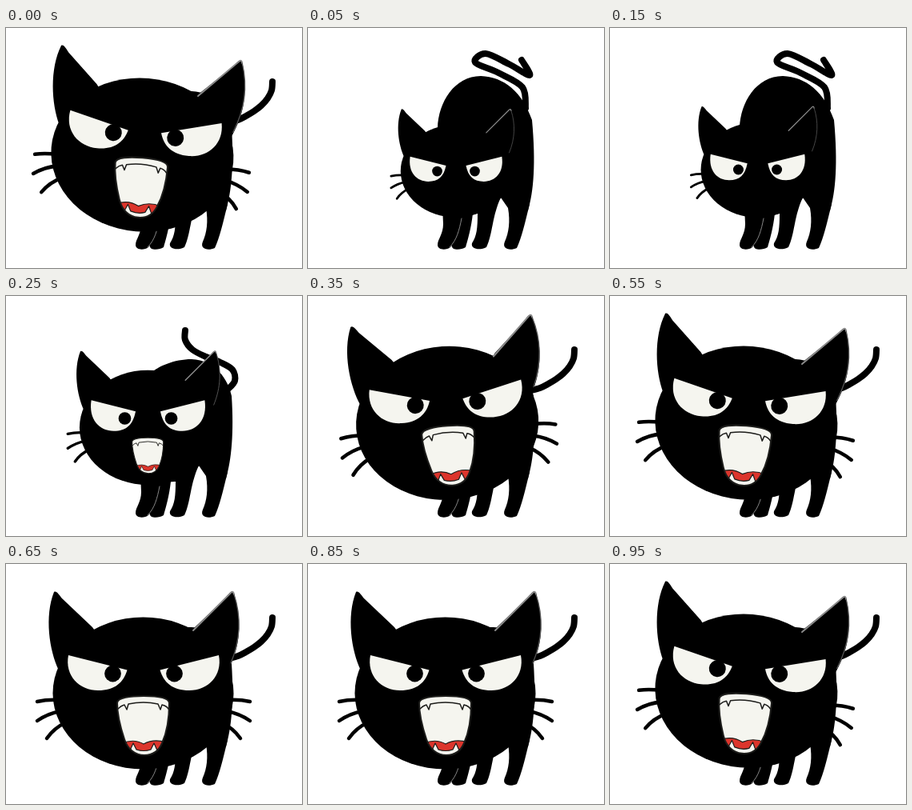
An HTML page with a canvas for the animation above (1000 ms loop, 370x300 px).

```html
<!DOCTYPE html>
<html lang="en">
<head>
<meta charset="utf-8">
<title>Hissing cat</title>
<style>
html, body { margin: 0; width: 100%; height: 100%; overflow: hidden; background: #fff; }
canvas { display: block; }
</style>
</head>
<body>
<canvas id="stage" width="370" height="300"></canvas>
<script>
const ctx = document.getElementById('stage').getContext('2d');
const LOOP = 1000;
const BLACK = '#000', WHITE = '#f5f5ef', RED = '#dc352c', LINE = '#1c1c1a';

// Tail shapes: curled, hooked, raised
const TAILS = [
  [272,100, 268,74, 238,56, 209,43, 222,32, 251,45, 277,59, 267,40],
  [277,117, 286,106, 283,92, 268,83, 250,76, 233,67, 224,55, 224,43],
  [278,118, 290,115, 300,110, 310,104, 319,97, 327,88, 332,78, 333,67]
];
// Back contour: arched, relaxed
const BACKS = [
  [162,125, 163,93, 183,60, 216,60, 245,61, 268,80, 280,115],
  [180,97, 190,88, 210,79, 232,79, 262,80, 278,105, 282,125]
];

const roar = (at, x, y, tilt, s = 1) =>
  ({ at, x, y, s, tilt, face: 0, lid: 0, mouth: 1, back: 1, tail: 2 });
const left = at => roar(at, 173, 158.3, -3.8, 1.01);
const right = at => roar(at, 173, 158.3, 4.9, 1.01);
const level = at => roar(at, 172, 161, 0);

const POSES = [
  right(0),
  { at: 50,  x: 185,   y: 178.5, s: .61,  tilt: 0, face: 25, lid: -7, mouth: 0,   back: 0,  tail: 0 },
  { at: 150, x: 184.5, y: 177,   s: .625, tilt: 0, face: 24, lid: -8, mouth: 0,   back: 0,  tail: 0 },
  { at: 200, x: 181,   y: 170,   s: .69,  tilt: 0, face: 16, lid: -7, mouth: .45, back: .5, tail: .5 },
  { at: 250, x: 177.5, y: 164,   s: .754, tilt: 0, face: 9.4, lid: -7, mouth: .8, back: 1,  tail: 1 },
  { at: 300, x: 175,   y: 162,   s: .88,  tilt: 0, face: 4,  lid: -3, mouth: .92, back: 1,  tail: 1.5 },
  left(350), level(450), right(550),
  level(650), left(750), level(850), right(950)
];

const mix = (a, b, k) => a.map((v, i) => v + (b[i] - v) * k);

function fill(d, color) {
  ctx.fillStyle = color;
  ctx.fill(new Path2D(d));
}

function stroke(d, color, width) {
  ctx.strokeStyle = color;
  ctx.lineWidth = width;
  ctx.stroke(new Path2D(d));
}

// Smooth curve through x,y pairs
function spline(p) {
  const n = p.length / 2;
  const at = (i, c) => p[2 * Math.max(0, Math.min(n - 1, i)) + c];
  let d = `M${p[0]},${p[1]}`;
  for (let i = 0; i < n - 1; i++) {
    const c = [];
    for (const k of [0, 1]) c.push(at(i, k) + (at(i + 1, k) - at(i - 1, k)) / 6);
    for (const k of [0, 1]) c.push(at(i + 1, k) - (at(i + 2, k) - at(i, k)) / 6);
    d += `C${c},${at(i + 1, 0)},${at(i + 1, 1)}`;
  }
  return d;
}

function drawTail(k) {
  const i = Math.min(1, Math.floor(k));
  stroke(spline(mix(TAILS[i], TAILS[i + 1], k - i)), BLACK, 8);
}

function drawBody(k) {
  const b = mix(BACKS[0], BACKS[1], k);
  fill(`M${b[0]},${b[1]}C${b.slice(2)}C285,170 282,205 275,228
    L242,212 L211,232 L168,235 Z`, BLACK);
  fill(`M168,222 L169,245 C169,258 162,264 162,271 C162,278 173,278 178,274 L180,272
    C179,278 191,278 197,274 C200,264 204,250 206,232 L212,232
    C212,250 211,260 205,269 C203,277 216,278 223,274 C231,258 230,235 241,212
    L250,225 C253,242 251,256 246,267 C242,276 252,279 261,275 C267,262 271,245 277,220
    L275,170 L165,190 Z`, BLACK);
  stroke('M192,238 C189,253 186,265 177,274', '#888', 1);
}

function mirrored(draw) {
  draw();
  ctx.save();
  ctx.translate(344, 0);
  ctx.scale(-1, 1);
  draw();
  ctx.restore();
}

function drawMouth(open) {
  if (!open) return;
  ctx.save();
  ctx.translate(172, 202 + (1 - open) * 30);
  ctx.scale(open, open);
  ctx.translate(-172, -201);
  const shape = `M139,173 C139,166 156,164 172,164 C188,164 204,166 204,173
    C204,193 200,212 195,223 C190,235 181,238 173,238
    C161,238 152,230 148,218 C142,200 139,186 139,173 Z`;
  fill(shape, WHITE);
  ctx.save();
  ctx.clip(new Path2D(shape));
  const tongue = `M145,223 Q160,217 172,224 Q185,217 200,222 L195,233
    L189,232 L185,223 L181,231 Q172,234 163,231 L159,223 L155,232 L149,232 Z`;
  fill(tongue, RED);
  stroke(tongue, LINE, 1.2);
  ctx.restore();
  stroke('M140,180 Q144,176 148,175 L151,181 L153,174 Q172,170 190,174 L193,181 L195,175 Q200,176 203,180', LINE, 1.5);
  stroke(shape, LINE, 2);
  ctx.restore();
}

function drawHead(p) {
  ctx.save();
  ctx.translate(p.x, p.y);
  ctx.scale(p.s, p.s);
  ctx.translate(0, -24);
  ctx.rotate(p.tilt * Math.PI / 180);
  ctx.translate(-172, -137);

  ctx.fillStyle = BLACK;
  ctx.beginPath();
  ctx.ellipse(171.5, 161.5, 113, 95, 0, 0, 7);
  ctx.fill();

  mirrored(() => {
    fill('M60,35 C63,33 66,38 70,43 L108,79 L130,110 L66,133 C54,108 48,65 60,35 Z', BLACK);
    stroke('M68,170 Q52,169 39,172 M68,184 Q52,187 39,196 M75,198 Q60,205 51,218', BLACK, 4.5);
  });
  fill('M283,35 C295,65 294,98 280,128 Z', BLACK);
  stroke('M234,83 L281,36 Q284,33 285,38', '#8a8a8a', 2);
  stroke('M285,38 C294,65 293,95 281,124', '#555', 1.3);

  ctx.save();
  ctx.translate(0, p.face);
  mirrored(() => {
    fill(`M78,${114 + p.lid} C73,140 92,158 115,158 C136,158 147,148 151.5,${132.5 + p.lid} Z`, WHITE);
    ctx.fillStyle = BLACK;
    ctx.beginPath();
    ctx.arc(133.5, 137, 10.4, 0, 7);
    ctx.fill();
  });
  ctx.restore();

  drawMouth(p.mouth);
  ctx.restore();
}

function draw(t) {
  const p = POSES.findLast(q => q.at <= t);
  ctx.fillStyle = '#fff';
  ctx.fillRect(0, 0, 370, 300);
  ctx.lineCap = ctx.lineJoin = 'round';
  drawTail(p.tail);
  drawBody(p.back);
  drawHead(p);
}

const start = performance.now();
function tick() {
  draw((performance.now() - start) % LOOP);
  requestAnimationFrame(tick);
}
tick();
</script>
</body>
</html>
```
